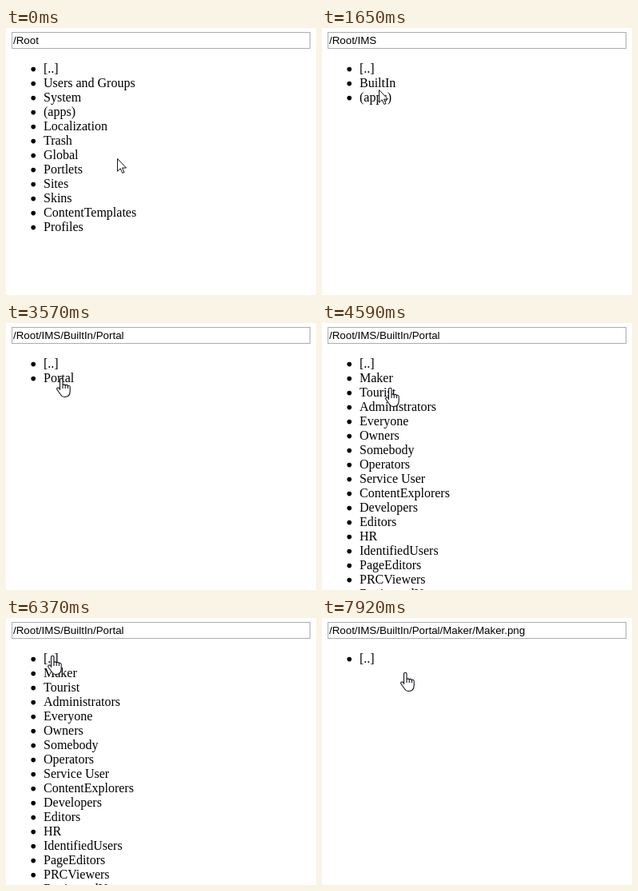
An HTML page for the animation above (8000 ms loop, 388 px wide and 334 px high).

```html
<!DOCTYPE html>
<html lang="en">
<head>
<meta charset="utf-8">
<title>Content browser</title>
<style>
html, body { margin: 0; width: 100%; height: 100%; overflow: hidden; background: #fff; }
svg { display: block; }
#path { font: 13.333px "Liberation Sans", Arial, sans-serif; }
#list { font: 16px "Liberation Serif", "Times New Roman", serif; }
</style>
</head>
<body>
<svg width="388" height="334" viewBox="0 0 388 334">
  <rect width="388" height="334" fill="#fff"/>
  <rect x="7.5" y="5.5" width="373" height="20" fill="#fff" stroke="#a9aeab"/>
  <text id="path" x="9" y="20"></text>
  <g id="list"></g>
  <g id="cursor" fill="#fff" stroke="#101018" stroke-linejoin="round">
    <path id="arrow" d="M.5 .5V16.3L4.2 12.8L6.8 18.5L9 17.5L6.5 12H11.5Z"/>
    <path id="hand" stroke-width="1.1" d="M-1.5 14.5V2a1.75 1.75 0 0 1 3.5 0V8.5q1.6-1.3 3.2.4q1.6-1.2 3.2.5q2.8-.6 2.8 2V16q0 7.5-6.5 7.5h-1q-2.5 0-4-2.5L-5 14.5q-1-2 .8-2.6q1.2-.2 2.7 1.6zM2 8.5v4.5M5.2 9v4M8.4 9.5v3.5"/>
  </g>
</svg>
<script>
const LOOP = 8000, ROW = 18, LIST_X = 47, LIST_TOP = 42;
const $ = id => document.getElementById(id);

const folders = {
  root: "Users and Groups,System,(apps),Localization,Trash,Global,Portlets,Sites,Skins,ContentTemplates,Profiles",
  ims: "BuiltIn,(apps)",
  builtIn: "Portal",
  portal: "Maker,Tourist,Administrators,Everyone,Owners,Somebody,Operators,Service User,ContentExplorers,Developers,Editors,HR,IdentifiedUsers,PageEditors,PRCViewers,RegisteredUsers",
  maker: "Maker.png",
  empty: ""
};

const PORTAL = "/Root/IMS/BuiltIn/Portal";
const paths = [
  [0, "/Root"],
  [880, "/Root/IMS"],
  [2820, "/Root/IMS/BuiltIn"],
  [3570, PORTAL],
  [5120, PORTAL + "/Tourist"],
  [6220, PORTAL],
  [7050, PORTAL + "/Maker"],
  [7830, PORTAL + "/Maker/Maker.png"]
];
const lists = [
  [0, "root"], [930, "ims"], [2820, "builtIn"], [3660, "portal"],
  [5120, "empty"], [6370, "portal"], [7050, "maker"], [7920, "empty"]
];

// Pointer moves: first step, last step, step count, destination x, y
const START = [139, 163];
const moves = [
  [100, 490, 6, 119, 67],
  [1320, 1568, 4, 75, 78],
  [1650, 1650, 1, 71, 77],
  [1800, 1950, 3, 69, 69],
  [2100, 2280, 3, 69, 85],
  [2430, 2580, 3, 69, 69],
  [4290, 4599, 5, 87, 82],
  [4676, 4830, 3, 78, 88],
  [5690, 5990, 5, 57, 46],
  [6370, 6850, 7, 78, 67],
  [7230, 7300, 2, 107, 73],
  [7370, 7440, 2, 104, 68]
];

const at = (track, t) => track.findLast(([time]) => time <= t)[1];
const smooth = p => p * p * (3 - 2 * p);

const svgEl = (tag, attrs, parent) => {
  const el = document.createElementNS("http://www.w3.org/2000/svg", tag);
  for (const key in attrs) el.setAttribute(key, attrs[key]);
  return parent.appendChild(el);
};

// Build every folder once, then toggle visibility
const views = {};
for (const name in folders) {
  const group = svgEl("g", {}, $("list"));
  const labels = ["[..]", ...folders[name].split(",").filter(Boolean)];
  const items = labels.map((label, i) => {
    const y = LIST_TOP + 14 + i * ROW;
    svgEl("circle", { cx: 34.2, cy: y - 4.4, r: 2.8 }, group);
    const text = svgEl("text", { x: LIST_X, y }, group);
    text.textContent = label;
    return text;
  });
  views[name] = { group, widths: items.map(el => el.getComputedTextLength()) };
}

function overLink(x, y, name) {
  const offset = y - LIST_TOP;
  const width = views[name].widths[Math.floor(offset / ROW)] || 0;
  return offset >= 0 && offset % ROW < 17 && x >= LIST_X && x <= LIST_X + width;
}

// The pointer shape only updates when the pointer moves
function pointer(t) {
  let [x, y] = START, moved = 0;
  for (const [from, to, steps, endX, endY] of moves) {
    if (t < from) break;
    const gap = steps > 1 ? (to - from) / (steps - 1) : 1;
    const step = Math.min(steps, Math.floor((t - from) / gap + 1e-6) + 1);
    const p = smooth(step / steps);
    x += (endX - x) * p;
    y += (endY - y) * p;
    moved = from + (step - 1) * gap;
  }
  return { x: Math.round(x), y: Math.round(y), moved };
}

function render(t) {
  $("path").textContent = at(paths, t);
  const current = at(lists, t);
  for (const name in views) {
    views[name].group.setAttribute("display", name === current ? "inline" : "none");
  }
  const { x, y, moved } = pointer(t);
  const link = overLink(x, y, at(lists, moved));
  $("cursor").setAttribute("transform", `translate(${x} ${y})`);
  $("hand").setAttribute("display", link ? "inline" : "none");
  $("arrow").setAttribute("display", link ? "none" : "inline");
}

const begin = performance.now();
function tick() {
  render((performance.now() - begin) % LOOP);
  requestAnimationFrame(tick);
}
tick();
</script>
</body>
</html>
```
